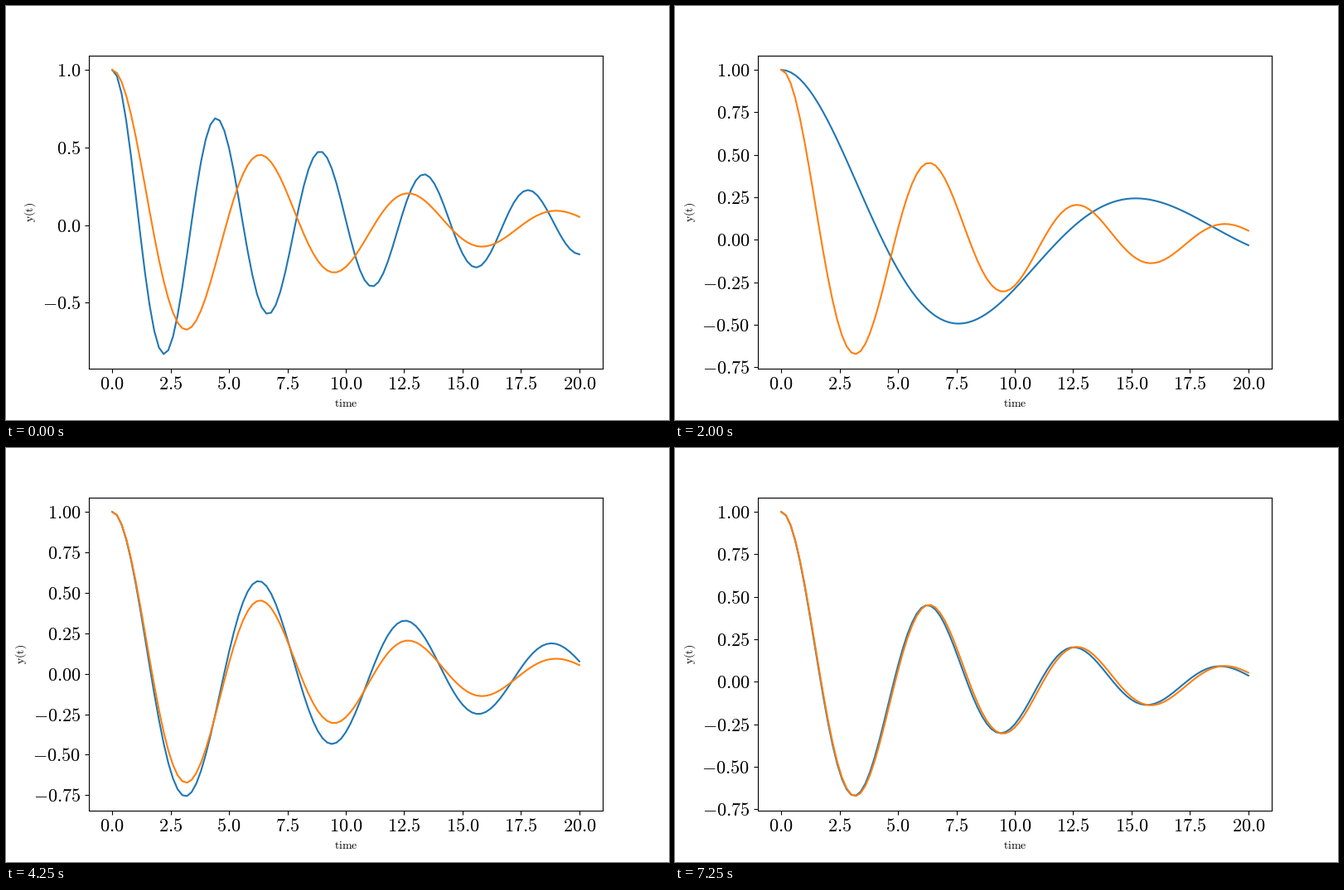
Write a matplotlib script that moves like this. It is 800x500 px and loops after 8000 ms.

```python
import matplotlib.pyplot as plt
import numpy as np
from matplotlib.animation import FuncAnimation

plt.rcParams["mathtext.fontset"] = "cm"

STEP_MS = 250
FRAMES = 32
T = np.linspace(0, 20, 101)

# (damping, stiffness) of the fitted oscillator after each iteration
FITS = [
    (0.167, 2.000), (0.171, 1.570), (0.177, -1.968), (0.186, 0.180),
    (0.185, 1.090), (0.1775, 1.025), (0.1776, 1.012), (0.191, 0.994),
    (0.226, 1.013), (0.252, 0.985), (0.2545, 1.023),
]
TARGET = (0.25, 1.0)


def response(damping, stiffness):
    """Solution of y'' + c y' + k y = 0 with y(0) = 1, y'(0) = 0."""
    b = damping / 2
    w = np.sqrt(complex(stiffness - b * b))
    return (np.exp(-b * T) * (np.cos(w * T) + b / w * np.sin(w * T))).real


def tick_texts(ticks, scale=1.0):
    values = np.round(np.asarray(ticks) / scale, 6) + 0.0
    digits = 1 if np.allclose(values * 10, np.round(values * 10)) else 2
    return [f"${v:.{digits}f}$" for v in values]


def ticks_inside(axis, low, high):
    ticks = axis.get_major_locator().tick_values(low, high)
    return [v for v in ticks if low <= v <= high]


fig = plt.figure(figsize=(8, 5), dpi=100)
ax = fig.add_axes([0.125, 0.125, 0.775, 0.755])
ax.tick_params(labelsize=16)
ax.set_xlabel(r"$\mathrm{time}$", fontsize=10)
ax.set_ylabel(r"$\mathrm{y(t)}$", fontsize=10)
ax.set_xlim(-1, 21)
xticks = np.arange(0, 20.1, 2.5)
ax.set_xticks(xticks, tick_texts(xticks))

target = response(*TARGET)
curves = [response(*fit) for fit in FITS]
fit_line, = ax.plot(T, curves[0], color="C0", lw=1.5)
ax.plot(T, target, color="C1", lw=1.5)
exponent = ax.annotate("", (0, 1), xycoords="axes fraction", xytext=(0, 3),
                       textcoords="offset points", fontsize=16,
                       va="baseline", ha="left")
auto_locator = ax.yaxis.get_major_locator()


def draw(i):
    y = curves[(i + 1) // 3]
    fit_line.set_ydata(y)

    low, high = min(y.min(), target.min()), max(y.max(), target.max())
    pad = 0.05 * (high - low)
    ax.yaxis.set_major_locator(auto_locator)
    ax.set_ylim(low - pad, high + pad)

    power = int(np.floor(np.log10(high) + 1e-9))
    ticks = ticks_inside(ax.yaxis, low - pad, high + pad)
    ax.set_yticks(ticks, tick_texts(ticks, 10.0 ** power))
    exponent.set_text(rf"$\times 10^{{{power}}}$" if power else "")
    return fit_line, exponent


anim = FuncAnimation(fig, draw, frames=FRAMES, interval=STEP_MS,
                     repeat=True, repeat_delay=0, blit=False)
plt.show()
```
